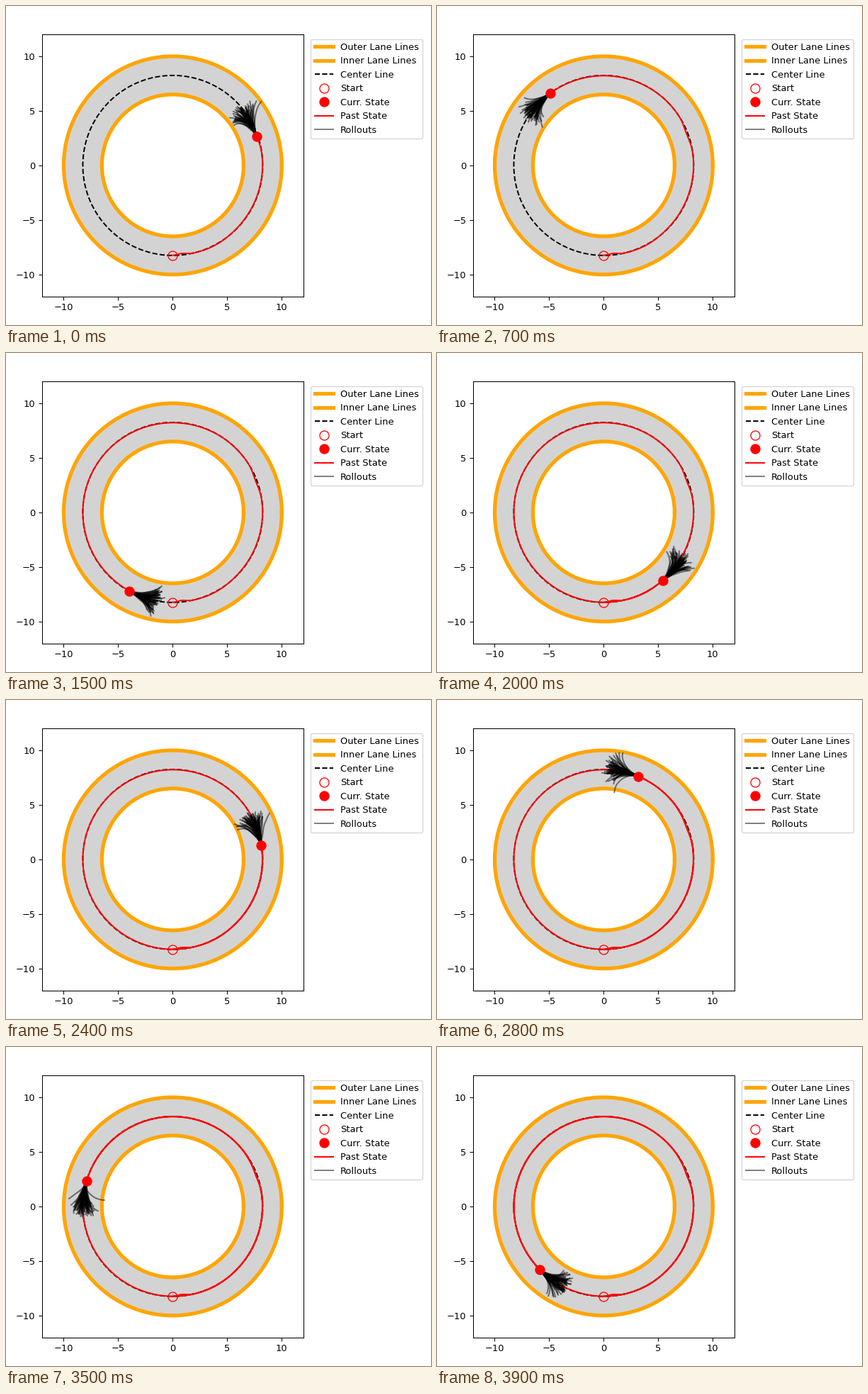
Write a matplotlib script that moves like this. It is 600 px wide and 450 px high and loops after 4 s.

```python
import numpy as np
import matplotlib.pyplot as plt
from matplotlib.animation import FuncAnimation
from matplotlib.collections import LineCollection

W, H = 600, 450
FRAMES, INTERVAL = 40, 100
R_OUT, R_IN, R_MID = 10, 6.5, 8.25
START = -90
ROLLOUTS, STEPS = 60, 20

# Key times (in frames) and vehicle angles (degrees, unwrapped)
KEY_T = [0, 7, 15, 20, 28, 32, 39]
KEY_DEG = [19, 126.5, 241, 311, 427.5, 478, 584.5]


def polar(deg, r):
    a = np.radians(deg)
    return r * np.cos(a), r * np.sin(a)


def bump(deg, centre, width):
    return np.exp(-((deg - centre) / width) ** 2)


def driven(deg):
    """Point on the driven path, with its small tracking errors."""
    r = (R_MID - 0.015 + 0.015 * np.sin(np.radians(2.7 * deg))
         - 0.14 * bump(deg, -84, 4) + 0.05 * bump(deg, -62, 12)
         - 0.12 * bump(deg, 21, 7) - 0.05 * bump(deg, 385, 10))
    return polar(deg, r)


def rollouts(i, deg):
    """Random steering fan ahead of the vehicle."""
    rng = np.random.default_rng(100 + i)

    def spread(mean, sigma):
        z = np.clip(rng.normal(size=(ROLLOUTS, 1)), -2, 2)
        return mean + sigma * z

    x, y = driven(deg)
    u = np.linspace(0, 1, STEPS)
    length = spread(2.85, 0.28)
    steer = spread(0, 0.28) * u + spread(0, 0.48) * u**2
    walk = np.cumsum(rng.normal(0, 0.06, (ROLLOUTS, STEPS)), axis=1)
    head = np.radians(deg + 90) + length * u / R_MID + steer + walk
    step = length / (STEPS - 1) * (u > 0)
    return np.stack([x + np.cumsum(step * np.cos(head), axis=1),
                     y + np.cumsum(step * np.sin(head), axis=1)], axis=-1)


fig = plt.figure(figsize=(6.4, 4.8), dpi=93.75)
ax = fig.add_axes([50.7 / W, 40.4 / H, 369.4 / W, 369.4 / H])
ax.set(xlim=(-12, 12), ylim=(-12, 12))
ax.set_xticks(range(-10, 11, 5))
ax.set_yticks(range(-10, 11, 5))

circle = np.linspace(0, 360, 400)
ax.fill(*polar(circle, R_OUT), color="lightgray", lw=0, zorder=1)
ax.fill(*polar(circle, R_IN), color="white", lw=0, zorder=1)
for name, r in (("Outer", R_OUT), ("Inner", R_IN)):
    ax.plot(*polar(circle, r), color="orange", lw=4, label=f"{name} Lane Lines")
ax.plot(*polar(circle, R_MID), "k--", label="Center Line")
ax.plot(0, -R_MID, "o", ms=10, mfc="none", mec="red", ls="none",
        zorder=3, label="Start")
car, = ax.plot([], [], "o", ms=10, color="red", ls="none", zorder=6,
               label="Curr. State")
trail, = ax.plot([], [], color="red", zorder=3, label="Past State")
ax.plot([], [], color="black", alpha=0.5, label="Rollouts")
fan = LineCollection([], colors="black", alpha=0.5, linewidths=1.5, zorder=4)
ax.add_collection(fan, autolim=False)
ax.legend(loc="upper left", bbox_to_anchor=(1.01, 1))


def update(i):
    deg = np.interp(i, KEY_T, KEY_DEG)
    x, y = driven(deg)
    car.set_data([x], [y])
    trail.set_data(*driven(np.linspace(START, deg, 400)))
    fan.set_segments(rollouts(i, deg))
    return trail, fan, car


anim = FuncAnimation(fig, update, frames=FRAMES, interval=INTERVAL,
                     repeat=True, repeat_delay=0)
plt.show()
```
